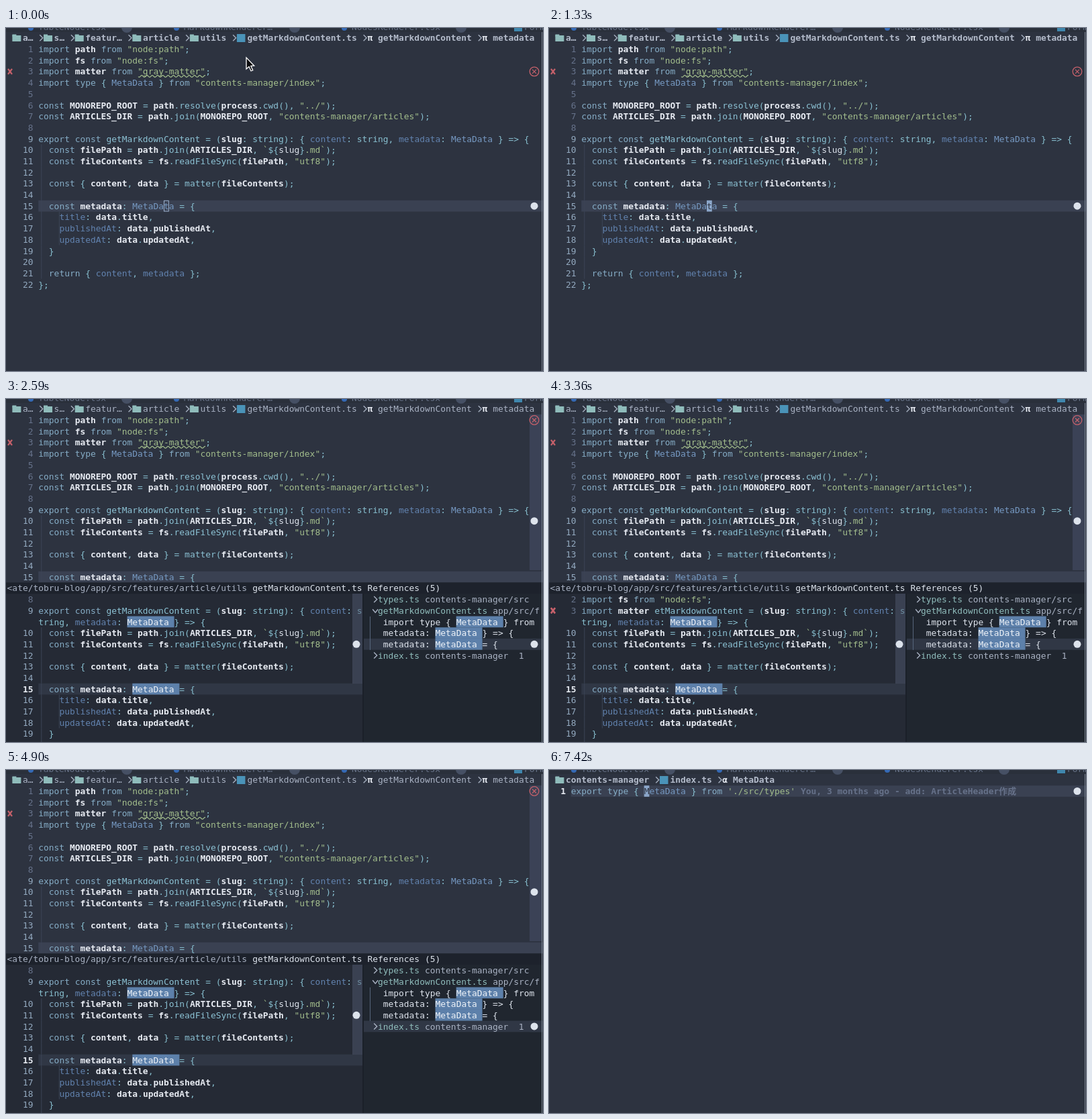
Animation, 800 px wide and 511 px high, one loop 8330 ms. Source, as an HTML page with a canvas:

```html
<!DOCTYPE html>
<html lang="en">
<head>
<meta charset="utf-8">
<title>Code references</title>
<style>
html, body { margin: 0; width: 100%; height: 100%; overflow: hidden; background: #2d3340; }
canvas { display: block; }
</style>
</head>
<body>
<canvas id="stage" width="800" height="511"></canvas>
<script>
const ctx = document.getElementById('stage').getContext('2d');
const LOOP = 8330, CW = 7.78, RH = 16.69;
const FONT = '12.92px "DejaVu Sans Mono", "Noto Sans CJK JP", "Noto Sans CJK", monospace';
const BG = '#2d3340', CURSOR_LINE = '#3a4152', BAR = '#1d222c', PREVIEW = '#252a35', LIST = '#20262f';
const RED = '#c4606a', LIGHT = '#dde3ec', GUIDE = '#3c4556';

// Style letters used in the marked-up text: ^x switches to style x.
const COLORS = {
  k: '#86adc6', c: '#88c0d0', w: '#e8ecf3', p: '#dde3ec', f: '#8cc2d4', s: '#a3be8c',
  d: '#6283af', t: '#7699c2', g: '#8e98ab', G: '#a9b2c3', B: '#b4bccb', h: '#eef2f8',
  n: '#66728a', N: '#93a9bf', T: '#8fbcbb', v: '#667189'
};
const BOLD = 'wBv';

const CODE = [
  '^kimport ^wpath ^kfrom ^s"node:path"^c;',
  '^kimport ^wfs ^kfrom ^s"node:fs"^c;',
  '^kimport ^wmatter ^kfrom ^s"gray-matter"^c;',
  '^kimport type ^c{ ^tMetaData ^c} ^kfrom ^s"contents-manager/index"^c;',
  '',
  '^kconst ^wMONOREPO_ROOT ^c= ^wpath^c.^fresolve^c(^wprocess^c.^fcwd^c(), ^s"../"^c);',
  '^kconst ^wARTICLES_DIR ^c= ^wpath^c.^fjoin^c(^wMONOREPO_ROOT^c, ^s"contents-manager/articles"^c);',
  '',
  '^kexport const ^fgetMarkdownContent ^c= (^wslug^c: string): { ^dcontent^c: string, ^dmetadata^c: ^tMetaData ^c} => {',
  '  ^kconst ^wfilePath ^c= ^wpath^c.^fjoin^c(^wARTICLES_DIR^c, ^s`^c${^pslug^c}^s.md`^c);',
  '  ^kconst ^wfileContents ^c= ^wfs^c.^freadFileSync^c(^wfilePath^c, ^s"utf8"^c);',
  '',
  '  ^kconst ^c{ ^wcontent^c, ^wdata ^c} = ^fmatter^c(^wfileContents^c);',
  '',
  '  ^kconst ^wmetadata^c: ^tMetaData ^c= {',
  '    ^dtitle^c: ^wdata^c.^wtitle^c,',
  '    ^dpublishedAt^c: ^wdata^c.^wpublishedAt^c,',
  '    ^dupdatedAt^c: ^wdata^c.^wupdatedAt^c,',
  '  ^c}',
  '',
  '  ^kreturn ^c{ ^dcontent^c, ^dmetadata ^c};',
  '^c};'
];
const EXPORT = "^kexport type ^c{ ^tMetaData ^c} ^kfrom ^s'./src/types'";

const colX = c => 1.6 + c * CW;
const midY = r => 14.8 + r * RH;
const mark = s => s.replace(/\^tMetaData/g, '^hMetaData');

function rect(x, y, w, h, color) {
  ctx.fillStyle = color;
  ctx.fillRect(x, y, w, h);
}
function band(x, row, w, color) { rect(x, midY(row) - RH / 2, w, RH, color); }

function disc(x, y, r, color) {
  ctx.fillStyle = color;
  ctx.beginPath();
  ctx.arc(x, y, r, 0, 7);
  ctx.fill();
}
function ring(x, y, r, width, color) {
  ctx.strokeStyle = color;
  ctx.lineWidth = width;
  ctx.beginPath();
  ctx.arc(x, y, r, 0, 7);
  ctx.stroke();
}
function path(points, width, color) {
  ctx.strokeStyle = color;
  ctx.lineWidth = width;
  ctx.beginPath();
  points.forEach(([x, y]) => ctx.lineTo(x, y));
  ctx.stroke();
}

// Marked-up text -> list of [char, style].
function cells(s) {
  const out = [];
  let style = 'p';
  for (let i = 0; i < s.length; i++) {
    if (s[i] === '^') style = s[++i];
    else out.push([s[i], style]);
  }
  return out;
}

function put(col, row, content) {
  const list = typeof content === 'string' ? cells(content) : content;
  for (let i = 0; i < list.length;) {
    const style = list[i][1], start = i;
    let run = '';
    while (i < list.length && list[i][1] === style) run += list[i++][0];
    const x = colX(col + start);
    if (style === 'h') band(x, row, run.length * CW, '#5d80aa');
    ctx.font = (BOLD.includes(style) ? 'bold ' : '') + FONT;
    ctx.fillStyle = COLORS[style];
    ctx.fillText(run, x, midY(row) + 4.6);
  }
}

function cross(row) {
  const y = midY(row);
  path([[3, y - 4], [9, y + 4]], 2.4, RED);
  path([[9, y - 4], [3, y + 4]], 2.4, RED);
}
function errorBadge(y) {
  ring(787, y, 6.8, 1.3, RED);
  path([[784, y - 3], [790, y + 3]], 1.3, RED);
  path([[790, y - 3], [784, y + 3]], 1.3, RED);
}
function chevron(col, row, color, down) {
  const x = colX(col) + 4, y = midY(row);
  path(down ? [[x - 4, y - 2], [x, y + 3], [x + 4, y - 2]]
            : [[x - 2, y - 4.5], [x + 2.5, y], [x - 2, y + 4.5]], 1.4, color);
}
function folder(x) {
  rect(x, 9.5, 6, 3, '#8fbcbb');
  rect(x, 11, 13, 9, '#8fbcbb');
}

function number(n, row, current) {
  const style = current ? 'w' : n < 9 ? 'n' : 'N';
  put(n < 10 ? 4 : 3, row, '^' + style + n);
}
function guides(n, row) {
  if (n < 10 || n > 21) return;
  rect(colX(6) + 4, midY(row) - RH / 2, 1, RH, GUIDE);
  if (n > 15 && n < 19) rect(colX(8) + 15, midY(row) - RH / 2, 1, RH, GUIDE);
}
function squiggle(row) {
  const pts = [];
  for (let x = 197; x <= 297; x++) pts.push([x, midY(row) + 7 + 1.4 * Math.sin(x * 0.8)]);
  path(pts, 1.2, '#a3be8c');
}

function tabs() {
  rect(0, 0, 800, 6, '#2a303b');
  [['TableNode.tsx', 48, 180], ['MarkdownRenderer…', 265, 430], ['NodesRenderer.tsx', 515, 678], ['Form', 772, 0]]
    .forEach(([name, x, badge]) => {
      ctx.font = FONT;
      ctx.fillStyle = '#667187';
      ctx.fillText(name, x, 3);
      if (badge) {
        disc(x - 11, 0, 4, '#3569b5');
        disc(badge, -1, 8, '#465064');
      } else rect(x - 15, 0, 12, 5, '#3f87ad');
    });
}

// Items: [column, label, icon]; icon is 'dir', 'file' or a symbol.
function crumbs(items, style) {
  items.forEach(([col, label, icon], i) => {
    const x = colX(col - 2);
    if (i) chevron(col - 3, 0, '#a3adbd');
    if (icon === 'dir') folder(x);
    else if (icon === 'file') rect(x, 9, 12.5, 12, '#4a93b8');
    else put(col - 2, 0, '^w' + icon);
    put(col, 0, '^' + style + label);
  });
}
const ARTICLE = [[3, 'a…', 'dir'], [9, 's…', 'dir'], [15, 'featur…', 'dir'], [26, 'article', 'dir'],
  [37, 'utils', 'dir'], [46, 'getMarkdownContent.ts', 'file'], [71, 'getMarkdownContent', 'π'], [93, 'metadata', 'π']];
const INDEX = [[3, 'contents-manager', 'dir'], [23, 'index.ts', 'file'], [35, 'MetaData', 'α']];

function editor(lines) {
  band(colX(6), 15, 800, CURSOR_LINE);
  for (let n = 1; n <= lines; n++) {
    guides(n, n);
    number(n, n, false);
    put(6, n, CODE[n - 1]);
  }
  cross(3);
  squiggle(3);
}

function blockCursor(col, row, char, filled) {
  const x = colX(col), y = midY(row) - RH / 2;
  if (filled) {
    rect(x, y, CW, RH, '#8ba6c9');
    ctx.font = FONT;
    ctx.fillStyle = BG;
    ctx.fillText(char, x, midY(row) + 4.6);
  } else {
    ctx.strokeStyle = '#9db3cf';
    ctx.lineWidth = 1;
    ctx.strokeRect(x + .5, y + .5, CW - 1, RH - 1);
  }
}

function preview(top, current, glitch) {
  let row = 17;
  for (let n = top; n <= CODE.length && row < 31; n++) {
    const text = cells(mark(CODE[n - 1]));
    if (n === current) band(colX(6), row, 531 - colX(6), '#303745');
    const stale = glitch && row === 17;
    const mixed = glitch && row === 18 && n === 9;
    const shown = stale ? 2 : mixed ? 3 : n;
    guides(shown, row);
    number(shown, row, n === current);
    if (shown === 3) cross(row);
    if (glitch && row === 18) cross(row);
    if (stale) put(6, row, CODE[1]);
    else {
      if (mixed) text.splice(0, 14, ...cells(CODE[2]).slice(0, 14));
      put(6, row, text.slice(0, 62));
    }
    if (n === 3) squiggle(row);
    row++;
    if (text.length > 62) put(6, row++, text.slice(62));
  }
}

function tree(selected, open) {
  const refs = [cells(mark(CODE[3])).slice(0, 29), '^dmetadata^c: ^hMetaData ^c} => {', '^dmetadata^c: ^hMetaData ^c= {'];
  band(533, selected, 267, '#303745');
  chevron(70, 17, '#a9b2c3');
  put(71, 17, '^Ttypes.ts ^Gcontents-manager/src');
  chevron(70, 18, '#a9b2c3', true);
  put(71, 18, '^TgetMarkdownContent.ts ^Gapp/src/f');
  rect(542, midY(19) - 8, 1, 3 * RH, '#56657b');
  refs.forEach((r, i) => put(72, 19 + i, typeof r === 'string' ? r.replace(/\^[dc]/g, '^p') : r.map(([c, s]) => [c, s === 'h' ? s : 'p'])));
  chevron(70, 22, '#a9b2c3', open);
  put(71, 22, '^Tindex.ts ^Gcontents-manager  1');
  if (open) {
    rect(539, midY(23) - 8, 3, RH, '#65738a');
    rect(543, midY(23) - 8, 3, RH, '#65738a');
    put(72, 23, '^pexport type { ^hMetaData ^pfrom'.replace(' ^pfrom', ' ^p} from'));
  }
  band(780, selected, 18, '#303745');
  disc(787, midY(selected), 5.5, LIGHT);
}

// Panel steps: start, selected row, preview top, preview line, glitch.
const STEPS = [
  [2450, 21, 8, 15], [3150, 20, 2, 9], [3360, 21, 8, 15, true], [3430, 21, 8, 15],
  [3990, 20, 2, 9], [4130, 19, 1, 4, true], [4200, 19, 1, 4], [4340, 20, 2, 9],
  [4550, 21, 8, 15], [4830, 22, 8, 15], [5250, 22, 8, 15], [5460, 23, 0, 1]
];

function panel(t) {
  const [, selected, top, current, glitch] = STEPS.filter(s => s[0] <= t).pop();
  const inIndex = selected === 23;
  rect(780, inIndex ? 190 : 23, 18, inIndex ? 83 : 232, 'rgba(80,88,118,.4)');
  errorBadge(inIndex ? midY(6) : midY(1));
  if (!inIndex) disc(787, midY(10), 5.5, LIGHT);

  rect(0, 273.5, 531, 238, inIndex ? '#292f3a' : PREVIEW);
  rect(531, 273.5, 269, 238, LIST);
  band(0, 16, 800, BAR);
  put(69, 16, '^pReferences (5)');
  if (inIndex) {
    put(1, 16, '^G~/private/tobru-blog/contents-manager ^pindex.ts');
    band(colX(4), 17, 531 - colX(4), '#333a48');
    put(2, 17, '^w1');
    put(4, 17, mark(EXPORT));
  } else {
    put(0, 16, '^G<ate/tobru-blog/app/src/features/article/utils ^pgetMarkdownContent.ts');
    preview(top, current, glitch);
    rect(516, 290, 15, top === 8 ? 134 : 117, 'rgba(80,88,112,.5)');
    disc(522, midY(top === 8 ? 21 : 26), 5.5, LIGHT);
  }
  rect(531, 290, 2, 221, '#1b2029');
  tree(selected, t >= 5250);
}

function mouse(t) {
  const u = Math.min(1, Math.max(0, (t - 70) / 490)), e = u * u * (3 - 2 * u);
  const x = 358 - 104 * e, y = 44 + 178 * e;
  if (t >= 700 && t < 910) ring(x, y + 2, 21.5, 4, '#22518d');
  ctx.beginPath();
  [[0, 0], [0, 17], [4, 13.5], [7, 20], [9.7, 19], [6.8, 12.6], [11.7, 12.2]].forEach(([a, b]) => ctx.lineTo(x + a, y + b));
  ctx.closePath();
  ctx.fillStyle = '#0b0b0d';
  ctx.fill();
  ctx.strokeStyle = '#fff';
  ctx.lineWidth = 1.3;
  ctx.stroke();
}

function draw(t) {
  rect(0, 0, 800, 511, BG);
  tabs();
  if (t < 2450) {
    crumbs(ARTICLE, 'B');
    editor(22);
    const moved = t >= 1610;
    blockCursor(moved ? 31 : 30, 15, moved ? 'a' : 't', t >= 700);
    errorBadge(midY(3));
    disc(787, midY(15), 5.5, LIGHT);
    if (t < 1330) mouse(t);
  } else if (t < 6300) {
    crumbs(ARTICLE, 'G');
    editor(15);
    panel(t);
  } else {
    crumbs(INDEX, 'B');
    band(colX(4), 1, 800, CURSOR_LINE);
    put(2, 1, '^w1');
    put(4, 1, EXPORT);
    blockCursor(18, 1, 'M', true);
    if (t >= 7140) put(48, 1, '^vYou, 3 months ago - add: ArticleHeader作成');
    disc(787, midY(1), 5.5, LIGHT);
  }
  rect(798, 6, 1, 505, '#78828f');
}

const begin = performance.now();
function tick() {
  draw((performance.now() - begin) % LOOP);
  requestAnimationFrame(tick);
}
tick();
</script>
</body>
</html>
```
